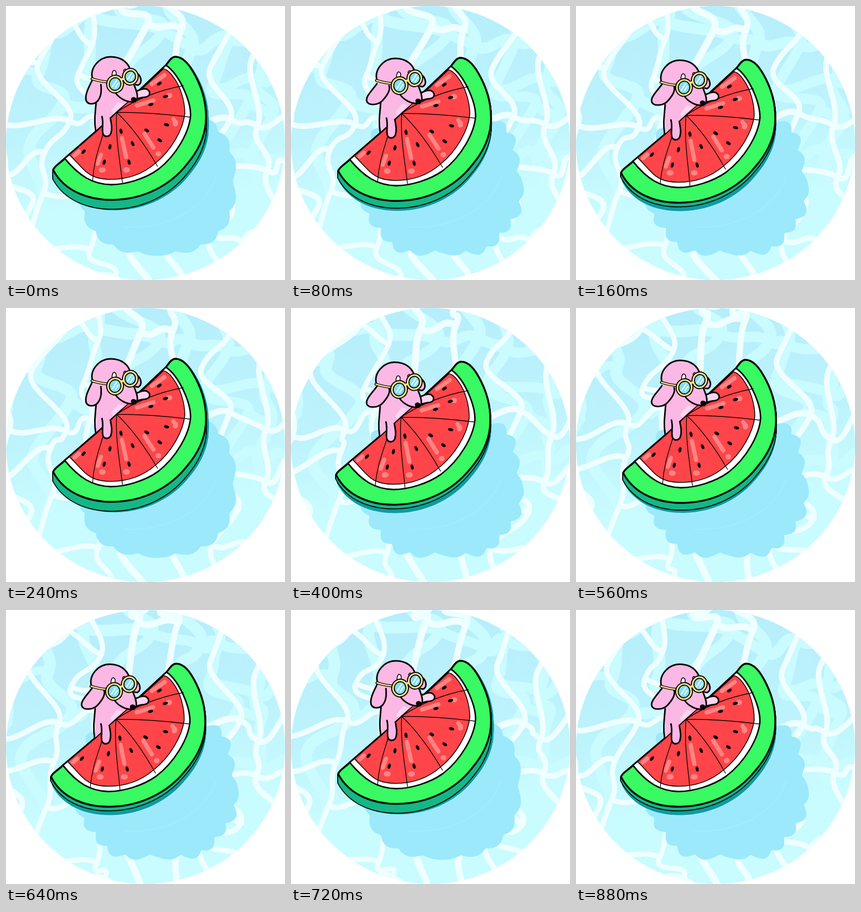
Recreate the animation shown at these times as an HTML page with a canvas. Size 532 px wide and 523 px high, loop 960 ms.

```html
<!DOCTYPE html>
<html lang="en">
<head>
<meta charset="utf-8">
<title>Pool float</title>
<style>
  html, body { margin: 0; width: 100%; height: 100%; overflow: hidden; background: #fff; }
  canvas { display: block; }
</style>
</head>
<body>
<canvas id="stage" width="532" height="523"></canvas>
<script>
const ctx = document.getElementById('stage').getContext('2d');
const STEP = 80, STEPS = 12, TAU = 2 * Math.PI;
const BLACK = '#050505', PINK = '#fbb8e4', BLUSH = '#fdd5f0', YELLOW = '#f8e28a', GLOSS = '#ff8484';

const RIND = 'M90 313C92 305 105 299 112 291L172 239L305 113C312 104 316 97 323 97C338 97 350 112 362 135C376 162 383 192 381 222C379 247 368 275 345 302C313 343 262 369 205 370C160 371 112 355 90 313Z';
const EARS = [
  'M166 138C161 150 149 168 153 181C157 189 169 188 175 181C182 172 182 162 181 150',
  'M164 149C156 161 140 175 145 184C149 191 166 191 175 181C184 171 190 161 187 153'
];

// depth: thickness of the rind's side; wet: offset of the dark water line below it
const POSES = [
  { melon: [1, 0, 0, 1, 0, 0], depth: 17, wet: [5, 3], dog: [0, 0], ear: 0, ragged: 0 },
  { melon: [1, 0, 0, 1, 0, 2], depth: 13, wet: [1, 6], dog: [-1, 3], ear: 1, ragged: 1 },
  { melon: [1, 0, -.026, 1, 4.1, 5.5], depth: 7, wet: [2, 9], dog: [-2, 6.5], ear: 1, ragged: 1 }
];

const noise = n => {
  const v = Math.sin(n * 127.1) * 43758.5;
  return v - Math.floor(v);
};

function shape(d, fill, line, width = 3) {
  const path = new Path2D(d);
  if (fill) { ctx.fillStyle = fill; ctx.fill(path); }
  if (line) { ctx.strokeStyle = line; ctx.lineWidth = width; ctx.stroke(path); }
}

function oval(x, y, rx, ry, angle, fill, line, width = 2) {
  ctx.beginPath();
  ctx.ellipse(x, y, rx, ry, angle, 0, TAU);
  ctx.fillStyle = fill;
  ctx.fill();
  if (line) { ctx.strokeStyle = line; ctx.lineWidth = width; ctx.stroke(); }
}

function shifted([x, y], draw) {
  ctx.save();
  ctx.translate(x, y);
  draw();
  ctx.restore();
}

// A loose net: wandering strands tied together by short bent links
function web(turn, seed, color, width) {
  const gap = 82;
  const knot = (col, row) => {
    const n = seed + col * 17 + row * 5.3, a = turn + TAU * noise(n);
    return [
      (col - .5 + (row % 2) * .4 + .65 * noise(n + 1)) * gap + 12 * Math.cos(a),
      (row - .7 + .65 * noise(n + 2)) * gap + 12 * Math.sin(a)
    ];
  };
  ctx.strokeStyle = color;
  for (let col = -1; col < 8; col++) {
    ctx.lineWidth = width * (.8 + .4 * noise(seed + col));
    ctx.beginPath();
    ctx.moveTo(...knot(col, 0));
    for (let row = 0; row < 8; row++) {
      const [x, y] = knot(col, row), [u, v] = knot(col, row + 1);
      ctx.bezierCurveTo(x - 16, y + 36, u + 16, v - 36, u, v);
      if (noise(seed + col * 3 + row * 7) < .55) {
        const [p, q] = knot(col + 1, row);
        ctx.moveTo(x, y);
        ctx.bezierCurveTo(x + 32, y + 18, p - 32, q - 18, p, q);
        ctx.moveTo(u, v);
      }
    }
    ctx.stroke();
  }
}

function water(turn) {
  const depth = ctx.createLinearGradient(120, 0, 190, 520);
  depth.addColorStop(0, '#b5edfb');
  depth.addColorStop(.45, '#bdf3fc');
  depth.addColorStop(.75, '#c9fcff');
  ctx.fillStyle = depth;
  ctx.fillRect(0, 0, 532, 523);
  web(turn, 40, '#c9fbff', 20);
  web(turn, 7, '#effeff', 11);
}

function shadow(ragged) {
  const squash = v => Math.sign(v) * Math.abs(v) ** .8;
  ctx.beginPath();
  for (let a = 0; a < TAU; a += .02) {
    const lobe = ragged
      ? .97 + .025 * Math.sin(7 * a) + .07 * Math.abs(Math.sin(11 * a + 1))
      : .97 + .05 * Math.abs(Math.sin(9 * a));
    ctx.lineTo(288 + 149 * lobe * squash(Math.cos(a)), 335 + 139 * lobe * squash(Math.sin(a)));
  }
  ctx.fillStyle = '#9ce9fb';
  ctx.fill();
  shape('M225 422C310 427 382 385 401 325', null, '#aceffc', 1);
}

function extrude(depth, fill, line) {
  for (let y = 0; y <= depth; y++) shifted([0, y], () => shape(RIND, fill, line, 3.5));
}

// Seeds lie in two rings around the hub where the slices meet
function seedRing(radius, degrees) {
  for (const deg of degrees) {
    const a = deg * TAU / 360;
    oval(211 + radius * Math.cos(a), 203 + radius * Math.sin(a), 5, 2.8, a, BLACK);
  }
}

function melon({ melon, depth, wet }) {
  ctx.save();
  ctx.transform(...melon);
  shifted(wet, () => extrude(depth, '#0d9c9f'));
  extrude(depth, null, BLACK);
  extrude(depth, '#14b785');
  shape(RIND, '#39fa62', BLACK, 3.5);
  shape('M112 291L172 239L305 113C330 130 352 180 352 208C350 240 325 285 290 312C265 330 228 341 200 341C165 340 140 325 112 291Z', '#fff', BLACK, 2.8);
  shape('M121 284L172 240L300 120C304 120 312 125 318 134C332 152 341 180 341 205C338 235 316 275 285 300C262 320 235 331 200 331C172 331 158 323 145 309Z', '#ff4549', BLACK, 1.6);
  shape('M211 203Q265 166 338 152M211 203Q280 203 350 212M211 203C240 230 265 265 289 306M211 203C208 250 218 300 222 337M188 234C180 265 168 290 165 334', null, BLACK, 1.4);
  shape('M250 190L281 180M264 244L281 270M221 252L229 288M181 284L175 301M139 278L131 285M278 149L302 132M319 216L324 224', null, GLOSS, 8);
  shape('M310 171h2M323 222v3M290 282h1M228 313h3M182 313h3', null, GLOSS, 10);
  seedRing(98, [-34, -18, 14, 33, 76, 104, 130]);
  seedRing(67, [-13, 31, 63, 101]);
  seedRing(37, [77]);
  ctx.restore();
}

function lens(x, y, r) {
  oval(x, y, r, r + 1, .2, YELLOW, BLACK, 2);
  oval(x, y, r - 5, r - 4, .2, '#83dcef', BLACK, 1.8);
  shape(`M${x - 5} ${y + 5}L${x + 3} ${y - 7}M${x + 1} ${y + 6}L${x + 6} ${y - 2}`, null, '#e2fbff', 2.6);
}

function dog({ dog, ear }) {
  shifted(dog, () => {
    shape('M246 127C257 130 262 146 252 151L240 149', PINK, BLACK);
    shape('M172 170L172 237L184 226L211 201L240 176L230 145Z', PINK);
    shape('M172 182C170 205 168 220 171 238', null, BLACK);
    shape('M214 183L224 187L205 206L200 200Z', BLUSH);
    shape('M244 164C255 161 262 156 269 159C277 164 275 173 265 174C258 174 252 177 247 178', BLUSH, BLACK);
    shape('M183 211C187 225 181 240 186 246C190 251 198 249 200 243C203 234 201 225 199 214', PINK, BLACK);
    shape('M166 140C158 118 178 97 200 97C222 97 235 110 239 126L250 163C253 176 252 183 244 184C230 185 216 176 210 168L180 170Z', PINK);
    shape('M165 139C159 118 178 97 200 97C220 97 233 108 237 122M244 150C248 160 252 170 250 178M209 166C216 176 230 184 243 183', null, BLACK);
    oval(244, 179, 6, 5, .4, BLACK);
  });
  shifted([0, ear && dog[1] / 3 - 2], () => shape(EARS[ear], PINK, BLACK));
  shifted(dog, () => {
    shape('M164 139Q180 144 194 145', null, BLACK, 5.5);
    shape('M164 139Q180 144 194 145', null, YELLOW, 2.5);
    shape('M202 132Q203 122 207 123Q211 124 210 131M224 124Q226 118 230 122', '#fff', BLACK, 1.6);
    lens(237, 135, 15);
    lens(208, 149, 16);
    shape('M220 140L224 139', null, YELLOW, 4);
  });
}

function frame(now) {
  const step = Math.floor(now / STEP) % STEPS;
  const pose = POSES[step % POSES.length];
  ctx.clearRect(0, 0, 532, 523);
  ctx.save();
  ctx.lineCap = ctx.lineJoin = 'round';
  ctx.beginPath();
  ctx.ellipse(266, 261.5, 266, 261.5, 0, 0, TAU);
  ctx.clip();
  water(step / STEPS * TAU);
  shadow(pose.ragged);
  melon(pose);
  dog(pose);
  ctx.restore();
  requestAnimationFrame(frame);
}
requestAnimationFrame(frame);
</script>
</body>
</html>
```
